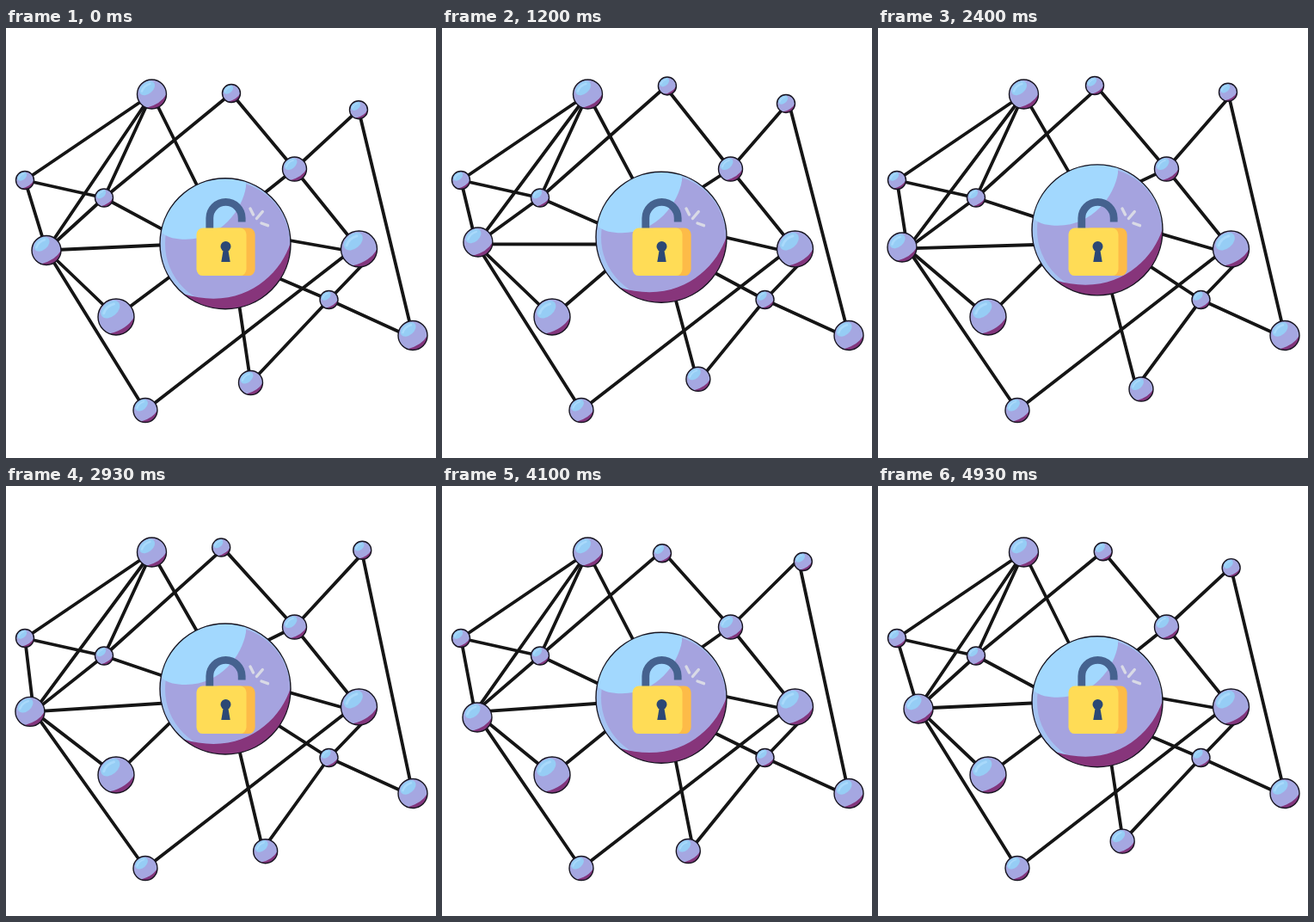
Recreate the animation shown at these times as an HTML page. Size 500 by 500 pixels, loop 5010 ms.

```html
<!DOCTYPE html>
<html lang="en">
<head>
<meta charset="utf-8">
<title>Unlocked network</title>
<style>
html, body { margin: 0; width: 100%; height: 100%; overflow: hidden; background: #fff; }
svg { display: block; width: 100vw; height: 100vh; }
</style>
</head>
<body>
<svg viewBox="0 0 500 500" xmlns="http://www.w3.org/2000/svg">
  <defs>
    <clipPath id="unit"><circle r="1"/></clipPath>
    <clipPath id="disc"><circle r="76"/></clipPath>
    <g id="ball">
      <g clip-path="url(#unit)">
        <circle r="1" fill="#a5a7e1"/>
        <ellipse cx="-.32" cy="-.42" rx=".6" ry=".4" transform="rotate(-40 -.32 -.42)" fill="#96cdf5"/>
        <path d="M-.68-.2Q-.55-.6-.12-.72" fill="none" stroke="#a9d9fb" stroke-width=".14" stroke-linecap="round"/>
        <path d="M1 0Q.62.68-.35.92L-.3 1.1H1.1Z" fill="#82357c"/>
      </g>
      <circle r="1" fill="none" stroke="#161420" stroke-width="1.4" vector-effect="non-scaling-stroke"/>
    </g>
  </defs>
  <g id="lines" stroke="#151515" stroke-width="3.8" stroke-linecap="round"></g>
  <g id="balls"></g>
  <g id="hub">
    <g clip-path="url(#disc)">
      <circle r="76" fill="#a3c3f2"/>
      <circle cx="2.5" r="72.5" fill="#a5a3df"/>
      <path d="M24-78V-66C20-40-5-5-46-5C-58-5-66-7-73-12L-80-80Z" fill="#a2d8fe"/>
      <path d="M77-5C66 36 20 80-50 58L-40 80H80Z" fill="#87357b"/>
    </g>
    <circle r="76" fill="none" stroke="#161420" stroke-width="1.4"/>
  </g>
  <g id="lock">
    <path d="M236.8 236V221a18.7 18.7 0 0 1 37.4 0V225.5" fill="none" stroke="#45628f" stroke-width="8.8"/>
    <rect x="240" y="232.5" width="49.6" height="55.6" rx="7.5" fill="#fdbb48"/>
    <rect x="221.5" y="232.5" width="58" height="55.6" rx="7.5" fill="#ffdc56"/>
    <circle cx="255.5" cy="254" r="6" fill="#2c4875"/>
    <path d="M253 256H258L260.7 272H250.3Z" fill="#2c4875"/>
    <path d="M284 210L287.5 217M298.3 213.5L291.5 221.5M304.5 229.7L297 227" fill="none" stroke="#d9dae6" stroke-width="3.4" stroke-linecap="round"/>
  </g>
</svg>
<script>
const LOOP = 5010, TAU = Math.PI * 2;
const NS = "http://www.w3.org/2000/svg";
const TIMES = [0, .16, .33, .48, .69, .82];
const $ = id => document.getElementById(id);

function add(tag, parent) {
  return $(parent).appendChild(document.createElementNS(NS, tag));
}

// Smooth closed curve through values that grow by `turn` per loop
function smooth(vals, turn) {
  const n = vals.length;
  const key = i => {
    const k = Math.floor(i / n), j = i - k * n;
    return [TIMES[j] + k, vals[j] + k * turn];
  };
  const slope = i => {
    const [t0, v0] = key(i - 1), [t1, v1] = key(i + 1);
    return (v1 - v0) / (t1 - t0);
  };
  return p => {
    let i = n - 1;
    while (TIMES[i] > p) i--;
    const [t0, v0] = key(i), [t1, v1] = key(i + 1);
    const d = t1 - t0, u = (p - t0) / d, w = 1 - u;
    return v0 * (1 + 2 * u) * w * w + v1 * u * u * (3 - 2 * u)
      + d * u * w * (slope(i) * w - slope(i + 1) * u);
  };
}

// Path around (cx, cy) in polar form; dir 1 is clockwise
function orbit(dir, cx, cy, pts) {
  const angles = [], radii = [];
  pts.forEach(([x, y], i) => {
    let a = Math.atan2(y - cy, x - cx);
    while (i && dir * (a - angles[i - 1]) < 0) a += dir * TAU;
    angles.push(a);
    radii.push(Math.hypot(x - cx, y - cy));
  });
  const angle = smooth(angles, dir * TAU), radius = smooth(radii, 0);
  return p => {
    const a = angle(p), r = radius(p);
    return [cx + r * Math.cos(a), cy + r * Math.sin(a)];
  };
}

// Line ends cut straight across an orbit between three keys
function chord(path) {
  const keys = [0, 1 / 3, 2 / 3, 0].map(path);
  return p => {
    const i = Math.floor(p * 3), u = p * 3 - i;
    return keys[i].map((v, k) => v + (keys[i + 1][k] - v) * u);
  };
}

const fixed = (x, y) => () => [x, y];
const hubAt = p => [255, 242.8 + 8 * Math.cos(TAU * p)];
const onHub = (dx, dy) => p => {
  const [x, y] = hubAt(p);
  return [x + dx, y + dy];
};

const left = orbit(-1, 37.5, 258.8, [[47, 258.5], [45, 251], [37.3, 248.5], [28, 255], [32, 267.5], [41, 269]]);
const top1 = orbit(-1, 257.3, 71.7, [[262, 76], [263.4, 70], [259, 65.6], [252, 67], [251.5, 75.6], [256, 78.3]]);
const right = orbit(1, 410.5, 84.7, [[410, 95.2], [401.5, 92], [400.4, 83], [407, 74.7], [419.3, 79], [419.8, 88]]);
const low = orbit(1, 295, 417, [[284.5, 412.5], [293, 407.5], [302.2, 411.5], [306, 420], [296.3, 426], [286.3, 424.5]]);
const [leftEnd, topEnd, rightEnd, lowEnd] = [left, top1, right, low].map(chord);

const peak = fixed(169.5, 77), west = fixed(22, 177), mid = fixed(114, 197.5),
  big = fixed(128, 336), south = fixed(162, 444.5), ne = fixed(335.5, 164),
  east = fixed(410.5, 257), se = fixed(375.5, 316), far = fixed(473, 357.5);

const balls = [
  [peak, 17], [west, 10.5], [mid, 10.5], [big, 21], [south, 14], [ne, 14],
  [east, 21], [se, 10.5], [far, 17], [left, 17], [top1, 10.5], [right, 10.5], [low, 14]
].map(([at, r]) => {
  const el = add("use", "balls");
  el.setAttribute("href", "#ball");
  return { at, r, el };
});

const lines = [
  [peak, west], [peak, leftEnd], [peak, mid], [west, mid], [west, leftEnd], [mid, leftEnd],
  [mid, topEnd], [leftEnd, big], [leftEnd, south], [ne, topEnd], [ne, rightEnd], [ne, east],
  [rightEnd, far], [se, fixed(473, 360.5)], [se, lowEnd],
  [se, fixed(413, 277)], [south, fixed(400, 260)], [leftEnd, fixed(200, 251.5)],
  [peak, onHub(-30, -62)], [mid, onHub(-66, -13)], [big, onHub(-61, 36)],
  [lowEnd, onHub(16, 70)], [se, onHub(51, 35.5)], [fixed(395, 258.5), onHub(0, -17)],
  [ne, onHub(32, -48)]
].map(([a, b]) => ({ a, b, el: add("line", "lines") }));

function draw(p) {
  for (const { a, b, el } of lines) {
    const [x1, y1] = a(p), [x2, y2] = b(p);
    for (const [k, v] of Object.entries({ x1, y1, x2, y2 })) el.setAttribute(k, v.toFixed(2));
  }
  for (const { at, r, el } of balls) {
    el.setAttribute("transform", `translate(${at(p)}) scale(${r})`);
  }
  $("hub").setAttribute("transform", `translate(${hubAt(p)})`);
}

// Steps alternate between 30 ms and 70 ms, a hundred per loop
function phase(t) {
  const step = 2 * Math.floor(t / 100) + (t % 100 >= 30 ? 1 : 0);
  return Math.min(step, 99) / 100;
}

function tick() {
  draw(phase(performance.now() % LOOP));
  requestAnimationFrame(tick);
}
tick();
</script>
</body>
</html>
```
